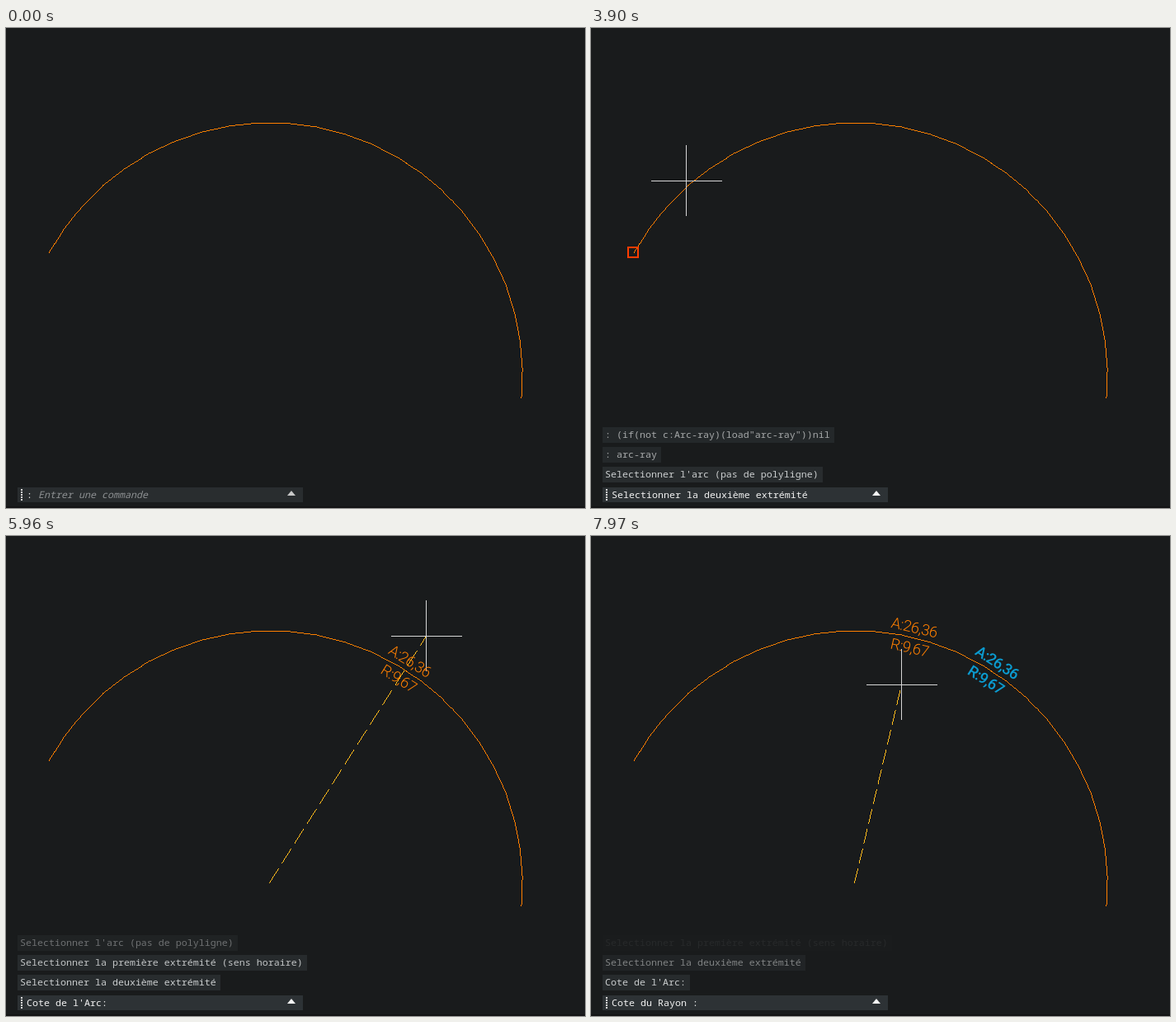
Recreate the animation shown at these times as an HTML page with a canvas. Size 702 by 582 pixels, loop 7.99 s.

```html
<!DOCTYPE html>
<html lang="fr">
<head>
<meta charset="utf-8">
<style>
html, body { margin: 0; width: 100%; height: 100%; overflow: hidden; background: #191b1c; }
body { position: relative; }
canvas { position: absolute; left: 0; top: 0; }
.floor { position: absolute; left: 0; top: 580px; width: 702px; height: 2px; background: #131415; }
.row, .bar { position: absolute; left: 14px; font: 11.667px 'Noto Sans Mono', 'DejaVu Sans Mono', monospace; }
.row { padding: 0 5px 0 3px; height: 19px; line-height: 18px; white-space: pre; background: #282c2e; color: #cccfd0; }
.bar { box-sizing: border-box; top: 557px; width: 346px; min-height: 18px; padding: 0 22px 0 11px; line-height: 18px; background: #2d3235; color: #f2f2f2; }
.bar i { color: #8d9092; }
.bar::before { content: ''; position: absolute; left: 4px; top: 2px; width: 2px; height: 14px;
  background: repeating-linear-gradient(#d8d8d8 0 2px, transparent 2px 3px); }
.bar::after { content: ''; position: absolute; left: 327px; top: 4px; border: solid transparent; border-width: 0 5px 6px;
  border-bottom-color: #f4f4f4; }
.idle { background: #292d2f; }
.idle::after { border-bottom-color: #c8c8c8; }
.label { position: absolute; left: 319.5px; top: 420.5px; width: 0; height: 0; color: #ff7f00;
  font: 300 18.5px/24px Roboto, 'Open Sans', sans-serif; letter-spacing: -.5px; }
.label span { position: absolute; left: -50px; width: 100px; text-align: center; top: -330px; }
.label span + span { top: -305px; }
.placed { color: #0b9bd0; font-weight: 500; letter-spacing: -.7px; }
</style>
</head>
<body>
<canvas width="702" height="582"></canvas>
<div class="label placed"><span>A:26,36</span><span>R:9,67</span></div>
<div class="label"><span>A:26,36</span><span>R:9,67</span></div>
<div class="floor"></div>
<div class="row"></div><div class="row"></div><div class="row"></div><div class="row"></div>
<div class="bar"></div>
<script>
const LOOP = 7990, CX = 320, CY = 421, R = 306.2, SEGMENTS = 24;
const START = 151.05, SWEEP = 156.2, RAD = Math.PI / 180;
const ORANGE = '#ff7f00', CROSS = '#d6d6d6';

const ctx = document.querySelector('canvas').getContext('2d');
const [placed, ghost] = document.querySelectorAll('.label');
const rows = document.querySelectorAll('.row');
const bar = document.querySelector('.bar');

const pickArc = "Selectionner l'arc (pas de polyligne)";
const pickFirst = 'Selectionner la première extrémité (sens horaire)';
const pickSecond = 'Selectionner la deuxième extrémité';
const arcLabel = "Cote de l'Arc:";

const prompts = [
  [0, ': <i>Entrer une commande</i>'], [1530, ':'], [1560, pickArc], [2850, pickFirst],
  [3860, pickSecond], [5040, arcLabel], [6050, 'Cote du Rayon :']
];
const log = [
  [1500, ': (if(not c:Arc-ray)(load"arc-ray"))nil'], [1530, ': arc-ray'], [2850, pickArc],
  [3940, pickFirst], [5100, pickSecond], [6050, arcLabel]
];
// time, x, y of the pointer
const path = [
  [1740, 680, 294], [2270, 393, 129], [2610, 393, 129], [2640, 393, 127], [2670, 393, 126],
  [2820, 393, 126], [2850, 394, 125], [3570, 115, 185], [4060, 115, 185], [4800, 591, 291],
  [5250, 591, 291], [5780, 506, 103], [6050, 510, 127], [6380, 499, 170], [6540, 499, 170],
  [6700, 376, 205], [6960, 270, 205], [7320, 350, 198], [7410, 316, 196], [7540, 305, 194],
  [7900, 378, 181], [7970, 376, 180]
];

function pointer(t) {
  const k = path.findIndex(p => p[0] > t);
  if (k < 0) return path[path.length - 1].slice(1);
  const [t0, x0, y0] = path[k - 1], [t1, x1, y1] = path[k];
  const u = (t - t0) / (t1 - t0), e = u * u * (3 - 2 * u);
  return [Math.round(x0 + (x1 - x0) * e), Math.round(y0 + (y1 - y0) * e)];
}

// hard-edged one pixel line; color may depend on step and column
function line(x0, y0, x1, y1, color) {
  const n = Math.ceil(Math.max(Math.abs(x1 - x0), Math.abs(y1 - y0)));
  for (let i = 0; i <= n; i++) {
    const x = Math.floor(x0 + (x1 - x0) * i / n), y = Math.floor(y0 + (y1 - y0) * i / n);
    const c = typeof color === 'string' ? color : color(i, x);
    if (!c) continue;
    ctx.fillStyle = c;
    ctx.fillRect(x, y, 1, 1);
  }
}

function box(x, y, size, width, color) {
  ctx.strokeStyle = color;
  ctx.lineWidth = width;
  ctx.strokeRect(x, y, size, size);
}

function arcPoint(i) {
  const a = (START - SWEEP * i / SEGMENTS) * RAD;
  return [CX + R * Math.cos(a), CY - R * Math.sin(a)];
}

function drawArc() {
  for (let i = 0; i < SEGMENTS; i++) line(...arcPoint(i), ...arcPoint(i + 1), ORANGE);
}

function drawMarker(t, x, y) {
  const blink = t >= 3790 && t < 3860;
  const nearArc = Math.abs(Math.hypot(x - CX, y - CY) - R) < 14;
  if (t < 2880 || t >= 5040 || blink || !nearArc) return;
  const angle = Math.atan2(CY - y, x - CX) / RAD;
  const [mx, my] = angle > START - SWEEP / 2 ? [51, 272] : [625, 448];
  box(mx - 6, my - 6, 12, 2, '#ff3c00');
}

function drawGuide(x, y) {
  const upright = Math.abs(x - CX) < 8;
  const tints = ['#2a62e8', '#dcdcdc', '#ffa800', '#dcdcdc'];
  line(CX - .5, CY - .5, x + .5, y + .5, (i, col) => i % 24 < 18 && (upright ? tints[col & 3] : '#ffbe1c'));
}

function drawConsole(t) {
  const k = prompts.filter(p => p[0] <= t).length - 1;
  if (bar.dataset.k !== String(k)) {
    bar.dataset.k = k;
    bar.innerHTML = prompts[k][1];
    bar.classList.toggle('idle', k === 0);
  }
  const shown = log.filter(l => l[0] <= t).reverse();
  rows.forEach((row, i) => {
    const entry = shown[i];
    row.hidden = !entry;
    if (!entry) return;
    row.textContent = entry[1];
    row.style.top = 532 - 24 * i + 'px';
    row.style.opacity = Math.max(0, Math.min(1, 1 - (t - entry[0] - 1900) / 2300));
  });
}

function frame() {
  const t = performance.now() % LOOP;
  const tracking = t >= 5270;
  ctx.clearRect(0, 0, 702, 582);
  drawArc();
  drawConsole(t);
  placed.hidden = t < 6050;
  ghost.hidden = !tracking;
  if (t >= 1740) {
    const [x, y] = pointer(t);
    if (t < 2850) {
      box(x - 3.5, y - 3.5, 8, 1, '#e4e4e4');
    } else {
      drawMarker(t, x, y);
      if (tracking) {
        drawGuide(x, y);
        ghost.style.transform = `rotate(${Math.atan2(x - CX, CY - y)}rad)`;
      }
      ctx.fillStyle = CROSS;
      ctx.fillRect(x - 42, y, 86, 1);
      ctx.fillRect(x, y - 43, 1, 86);
    }
  }
  requestAnimationFrame(frame);
}

placed.style.transform = 'rotate(32.8deg)';
frame();
</script>
</body>
</html>
```
